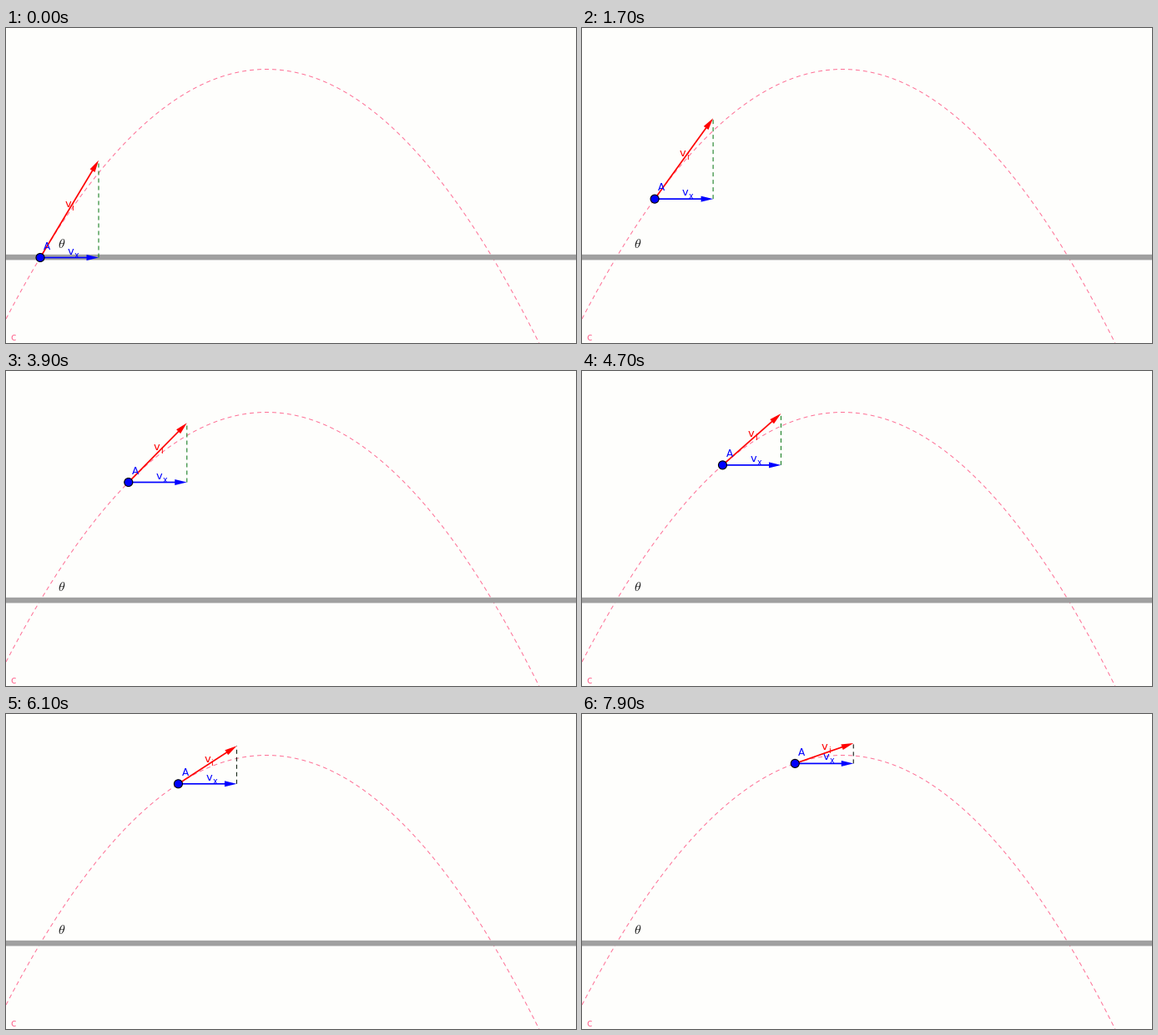
A matplotlib script that plays this animation: 683x378 px, repeating every 8 s.

```python
import numpy as np
import matplotlib.pyplot as plt
from matplotlib.animation import FuncAnimation
from matplotlib.patches import Circle, Polygon

W, H, DPI = 683, 378, 64
FRAMES, INTERVAL = 80, 100
PX = 72 / DPI                      # one pixel in points

X0, Y0 = 41.0, 275.5               # launch point
APEX_X, APEX_Y = 312.0, 49.5
CURVE = (Y0 - APEX_Y) / (APEX_X - X0) ** 2
STEP = 2.712                       # pixels per frame
VX = 70.0                          # length of the horizontal component
DASH = (5, 4)
BLUE, RED, PINK = "#0000ff", "#ff0000", "#ff6f95"
GREEN, DARK = np.array([0.1, 0.5, 0.14]), np.array([0.07, 0.09, 0.07])

plt.rcParams["font.family"] = "DejaVu Sans"
plt.rcParams["mathtext.fontset"] = "cm"

fig = plt.figure(figsize=(W / DPI, H / DPI), dpi=DPI, facecolor="#fefefc")
ax = fig.add_axes([0, 0, 1, 1])
ax.set(xlim=(0, W), ylim=(H, 0))
ax.axis("off")


def line(color, width, z, dash=None, xs=(), ys=()):
    art, = ax.plot(xs, ys, color=color, lw=width * PX, zorder=z, snap=False,
                   solid_capstyle="butt", dash_capstyle="butt")
    if dash:
        art.set_dashes([d / width for d in dash])
    return art


def label(text, size, color, x=0, y=0):
    return ax.text(x, y, text, fontsize=size * PX, color=color,
                   ha="left", va="baseline", zorder=9)


def height(x):
    return APEX_Y + CURVE * (x - APEX_X) ** 2


class Arrow:
    HEAD, HALF = 14.5, 3.5

    def __init__(self, color, sub, z):
        self.shaft = line(color, 1.7, z)
        self.head = Polygon(np.zeros((3, 2)), closed=True, fc=color,
                            ec="none", zorder=z, snap=False)
        ax.add_patch(self.head)
        self.name = label("v", 13, color)
        self.sub = label(sub, 9.5, color)

    def place(self, start, vec):
        start, vec = np.array(start), np.array(vec)
        u = vec / np.hypot(*vec)
        n = np.array([u[1], -u[0]])
        tip = start + vec
        base = tip - u * self.HEAD
        self.shaft.set_data(*np.transpose([start, base + u]))
        self.head.set_xy([tip, base + n * self.HALF, base - n * self.HALF])
        pos = start + vec / 2 + n * 4 + (-2, 0)
        self.name.set_position(pos)
        self.sub.set_position(pos + (8, 4))


xs = np.linspace(0, W, 700)
line(PINK, 1, 1, DASH, xs, height(xs))
line("#a0a0a0", 6.6, 2, None, (0, W), (275.1, 275.1))
label("c", 12, "#ff6a92", 5, 375)
label(r"$\theta$", 16, "#202020", 62, 264)

drop = line("green", 1.1, 3, DASH)
v_x = Arrow(BLUE, "x", 4)
v_i = Arrow(RED, "i", 5)
point = Circle((X0, Y0), 5, fc=BLUE, ec="black", lw=1.1 * PX, zorder=7)
ax.add_patch(point)
name = label("A", 12, BLUE)


def update(i):
    x = X0 + STEP * i
    y = height(x)
    rise = 2 * CURVE * (x - APEX_X) * VX
    v_x.place((x, y), (VX, 0))
    v_i.place((x, y), (VX, rise))
    drop.set_data([x + VX] * 2, [y, y + rise])
    # The dropped line turns nearly black late in the climb.
    fade = np.clip((i - 47) / 16, 0, 1)
    drop.set_color(tuple(GREEN + (DARK - GREEN) * fade))
    point.center = x, y
    name.set_position((x + 4, y - 9.7))
    return ()


anim = FuncAnimation(fig, update, frames=FRAMES, interval=INTERVAL,
                     repeat=True, repeat_delay=0)
plt.show()
```
